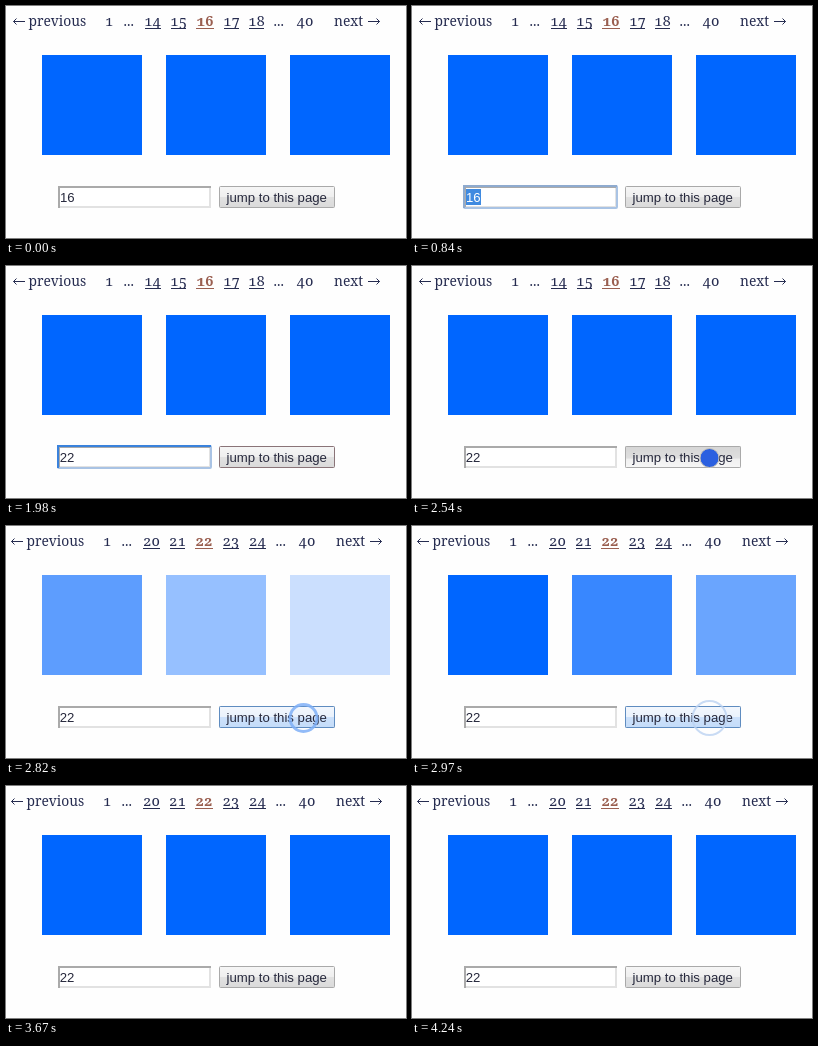
An HTML page for the animation above (4.34 s loop, 400 by 232 pixels).

```html
<!DOCTYPE html>
<html lang="en">
<head>
<meta charset="utf-8">
<title>Pager</title>
<style>
html, body { margin: 0; width: 100%; height: 100%; overflow: hidden; background: #fefefe; }
svg { display: block; width: 400px; height: 232px; }
svg * { animation: 4340ms step-end infinite; }

.pager text { font: 13.8px "Noto Serif", serif; fill: #262c50; }
.pager .num { font-size: 14.5px; font-feature-settings: "onum"; text-anchor: middle; }
.pager .now { font-weight: bold; fill: #9a5f50; }
.pager path { fill: none; stroke: #262c50; }
.pager .mark { stroke: #9a5f50; }
.form text { font: 13.2px "Liberation Sans", Arial, sans-serif; fill: #26283c; }
.form .sel { fill: #fff; }

.before { animation-name: before; }
.after { animation-name: after; }
@keyframes before { 0% { opacity: 1; } 61.75%, 100% { opacity: 0; } }
@keyframes after { 0% { opacity: 0; } 61.75%, 100% { opacity: 1; } }

.squares rect { fill: #06f; }
.sq1 { animation-name: sq1; }
.sq2 { animation-name: sq2; }
.sq3 { animation-name: sq3; }
@keyframes sq1 { 0% { opacity: 1; } 61.75% { opacity: .27; } 64.97% { opacity: .63; } 68.43%, 100% { opacity: 1; } }
@keyframes sq2 { 0% { opacity: 1; } 61.75% { opacity: .05; } 64.97% { opacity: .41; } 68.43% { opacity: .78; } 71.65%, 100% { opacity: 1; } }
@keyframes sq3 { 0% { opacity: 1; } 61.75% { opacity: 0; } 64.97% { opacity: .2; } 68.43% { opacity: .58; } 71.65%, 100% { opacity: 1; } }

.focus { animation-name: focus; }
.select { animation-name: select; }
.old { animation-name: old; }
.key1 { animation-name: key1; }
.key2 { animation-name: key2; }
.glow { animation-name: glow; }
@keyframes focus { 0% { opacity: 0; } 9.67% { opacity: 1; } 58.52%, 100% { opacity: 0; } }
@keyframes glow { 0% { stroke: #8fabcf; } 26.03%, 100% { stroke: #3a82dc; } }
@keyframes select { 0% { opacity: 0; } 12.9% { opacity: 1; } 26.03%, 100% { opacity: 0; } }
@keyframes old { 0% { opacity: 1; } 12.9%, 100% { opacity: 0; } }
@keyframes key1 { 0% { opacity: 0; } 26.03%, 100% { opacity: 1; } }
@keyframes key2 { 0% { opacity: 0; } 32.48%, 100% { opacity: 1; } }

.button { stroke: #a9a9a9; animation-name: button; }
.press { animation-name: press; }
.hot { animation-name: hot; }
@keyframes button { 0% { stroke: #a9a9a9; } 45.62% { stroke: #8a7478; } 55.29%, 100% { stroke: #a9a9a9; } }
@keyframes press { 0% { opacity: 0; } 55.29% { opacity: 1; } 61.75%, 100% { opacity: 0; } }
@keyframes hot { 0% { opacity: 0; } 61.75% { opacity: 1; } 71.65%, 100% { opacity: 0; } }

.dot { animation-name: press; }
.ring { fill: none; animation-name: ring; }
@keyframes ring {
  0% { opacity: 0; r: 11px; stroke: #5e97f2; stroke-width: 3px; }
  61.75% { opacity: .85; r: 11px; stroke: #5e97f2; stroke-width: 3px; }
  64.97% { opacity: .85; r: 13.5px; stroke: #7fb0f7; stroke-width: 3px; }
  68.43% { opacity: .8; r: 17px; stroke: #bcd3f2; stroke-width: 2px; }
  71.65% { opacity: 1; r: 20px; stroke: #e0deda; stroke-width: 1px; }
  74.88%, 100% { opacity: 0; r: 20px; stroke: #e0deda; stroke-width: 1px; }
}
</style>
</head>
<body>
<svg viewBox="0 0 400 232">
  <defs>
    <linearGradient id="plain" x2="0" y2="1">
      <stop stop-color="#f6f6f6"/><stop offset=".48" stop-color="#efefef"/>
      <stop offset=".48" stop-color="#e2e2e2"/><stop offset="1" stop-color="#dadada"/>
    </linearGradient>
    <linearGradient id="down" x2="0" y2="1">
      <stop stop-color="#d6d6d6"/><stop offset=".55" stop-color="#dedede"/>
      <stop offset=".6" stop-color="#f0f0f0"/><stop offset="1" stop-color="#f6f6f6"/>
    </linearGradient>
    <linearGradient id="blue" x2="0" y2="1">
      <stop stop-color="#f3f7fd"/><stop offset=".48" stop-color="#eaf2fc"/>
      <stop offset=".48" stop-color="#cde1fb"/><stop offset="1" stop-color="#c4dcf9"/>
    </linearGradient>
    <g id="head" class="pager">
      <path d="M19 15.5H7.5M10.5 12.5L7.5 15.5L10.5 18.5"/>
      <text x="22.5" y="20">previous</text>
      <text class="num" x="103" y="20">1</text>
      <text x="117.5" y="20">...</text>
    </g>
    <g id="tail" class="pager">
      <text x="267.5" y="20">...</text>
      <text class="num" x="299" y="20">40</text>
      <text x="328" y="20">next</text>
      <path d="M362 15.5H373.5M370.5 12.5L373.5 15.5L370.5 18.5"/>
    </g>
  </defs>

  <g class="pager before">
    <use href="#head"/>
    <text class="num" x="146.5" y="20">14</text>
    <text class="num" x="172.5" y="20">15</text>
    <text class="num now" x="199" y="20">16</text>
    <text class="num" x="225.5" y="20">17</text>
    <text class="num" x="250.5" y="20">18</text>
    <path d="M139 22.5h16M165 22.5h15M218 22.5h15M243 22.5h15"/>
    <path class="mark" d="M190 22.5h18"/>
    <use href="#tail"/>
  </g>
  <g class="pager after">
    <use href="#head" x="-2"/>
    <text class="num" x="145.5" y="20">20</text>
    <text class="num" x="171.5" y="20">21</text>
    <text class="num now" x="198" y="20">22</text>
    <text class="num" x="225" y="20">23</text>
    <text class="num" x="251.5" y="20">24</text>
    <path d="M137 22.5h17M164 22.5h15M217 22.5h16M243 22.5h17"/>
    <path class="mark" d="M189 22.5h18"/>
    <use href="#tail" x="2"/>
  </g>

  <g class="squares">
    <rect class="sq1" x="36" y="49" width="100" height="100"/>
    <rect class="sq2" x="160" y="49" width="100" height="100"/>
    <rect class="sq3" x="284" y="49" width="100" height="100"/>
  </g>

  <g class="form">
    <rect x="52" y="180" width="153" height="22" fill="#fff"/>
    <path d="M53 202V181H205" fill="none" stroke="#aaa" stroke-width="2"/>
    <path d="M54 201H204V182" fill="none" stroke="#e2e2e2" stroke-width="2"/>
    <g class="focus" fill="none" stroke-width="2">
      <rect x="52" y="180" width="153" height="22" rx="1" stroke="#a9c3e4"/>
      <path class="glow" d="M52 202V180H205"/>
    </g>
    <text class="old" x="54" y="196">16</text>
    <g class="select">
      <rect x="54" y="183" width="15" height="16" fill="#3f8ae0"/>
      <text class="sel" x="54" y="196">16</text>
    </g>
    <text class="key1" x="53.7" y="196">2</text>
    <text class="key2" x="61" y="196">2</text>

    <rect class="button" x="213.5" y="180.5" width="115" height="21" rx="1" fill="url(#plain)"/>
    <rect class="press" x="213.5" y="180.5" width="115" height="21" rx="1" fill="url(#down)" stroke="#aaa"/>
    <rect class="hot" x="213.5" y="180.5" width="115" height="21" rx="1" fill="url(#blue)" stroke="#5f8cc0"/>
    <text x="220.5" y="196">jump to this page</text>
  </g>

  <circle class="dot" cx="297.5" cy="192" r="9.5" fill="#2b60e0" stroke="#c8c4b8"/>
  <circle class="ring" cx="297.5" cy="192" r="11"/>
</svg>
</body>
</html>
```
